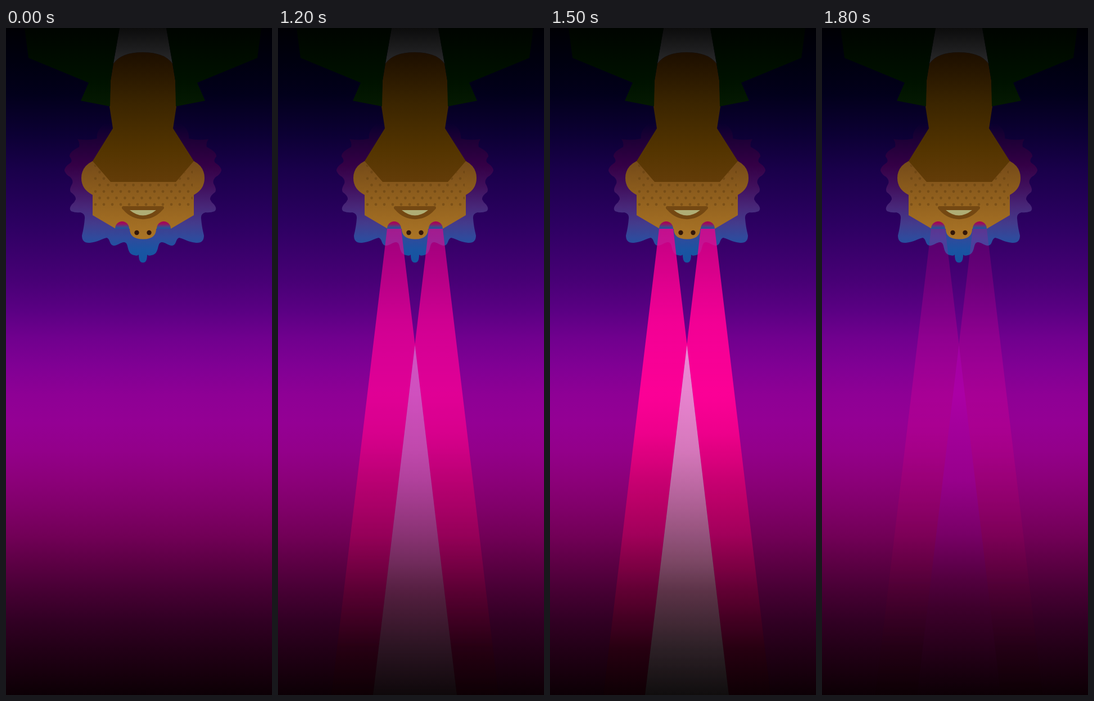
An HTML page for the animation above (1900 ms loop, 473 px wide and 1183 px high).

```html
<!DOCTYPE html>
<html lang="en">
<head>
<meta charset="utf-8">
<title>Laser eyes</title>
<style>
html, body { margin: 0; width: 100%; height: 100%; overflow: hidden; background: #000; }
svg { display: block; width: 100vw; height: 100vh; }
.beam, .tint, .glow { opacity: 0; animation: 1900ms step-end infinite; }
.beam { animation-name: beam; }
.tint { animation-name: tint; }
.glow { animation-name: glow; }
@keyframes beam {
  0% { opacity: 0; }
  52.63%, 94.73% { opacity: .23; }
  57.89%, 89.47% { opacity: .48; }
  63.15%, 84.21% { opacity: .73; }
  68.42%, 78.94% { opacity: .97; }
  73.68% { opacity: 1; }
  100% { opacity: 0; }
}
@keyframes tint {
  0% { opacity: 0; }
  52.63% { opacity: 1; }
  100% { opacity: 0; }
}
@keyframes glow {
  0%, 52.63%, 94.73% { opacity: 0; }
  57.89%, 89.47% { opacity: .25; }
  63.15%, 84.21% { opacity: .5; }
  68.42%, 78.94% { opacity: .82; }
  73.68% { opacity: 1; }
  100% { opacity: 0; }
}
</style>
</head>
<body>
<svg viewBox="0 0 473 1183" preserveAspectRatio="none">
  <defs>
    <linearGradient id="sky" gradientUnits="userSpaceOnUse" x1="0" y1="0" x2="0" y2="1183">
      <stop offset="0" stop-color="#000004"/>
      <stop offset=".05" stop-color="#00000f"/>
      <stop offset=".1" stop-color="#02001b"/>
      <stop offset=".16" stop-color="#0c0034"/>
      <stop offset=".212" stop-color="#19004a"/>
      <stop offset=".296" stop-color="#2d0062"/>
      <stop offset=".38" stop-color="#480076"/>
      <stop offset=".423" stop-color="#5a0083"/>
      <stop offset=".465" stop-color="#70008e"/>
      <stop offset=".507" stop-color="#800094"/>
      <stop offset=".55" stop-color="#8e0095"/>
      <stop offset=".592" stop-color="#940094"/>
      <stop offset=".634" stop-color="#93008a"/>
      <stop offset=".676" stop-color="#8c007a"/>
      <stop offset=".72" stop-color="#800069"/>
      <stop offset=".761" stop-color="#720057"/>
      <stop offset=".803" stop-color="#5c0044"/>
      <stop offset=".845" stop-color="#460033"/>
      <stop offset=".888" stop-color="#320024"/>
      <stop offset=".93" stop-color="#230017"/>
      <stop offset=".972" stop-color="#16000c"/>
      <stop offset="1" stop-color="#0c0005"/>
    </linearGradient>
    <linearGradient id="pink" gradientUnits="userSpaceOnUse" x1="0" y1="356" x2="0" y2="1183">
      <stop offset="0" stop-color="#f0008c" stop-opacity=".78"/>
      <stop offset=".08" stop-color="#fa0090" stop-opacity=".83"/>
      <stop offset=".2" stop-color="#ff0096" stop-opacity=".95"/>
      <stop offset=".355" stop-color="#ff0096"/>
      <stop offset=".44" stop-color="#f0008b"/>
      <stop offset=".537" stop-color="#cc0072"/>
      <stop offset=".658" stop-color="#a3005a"/>
      <stop offset=".779" stop-color="#610033"/>
      <stop offset=".9" stop-color="#280012"/>
      <stop offset="1" stop-color="#0f0005"/>
    </linearGradient>
    <linearGradient id="violet" gradientUnits="userSpaceOnUse" x1="0" y1="562" x2="0" y2="1183">
      <stop offset="0" stop-color="#a000a4"/>
      <stop offset=".14" stop-color="#ab00a5"/>
      <stop offset=".383" stop-color="#98008c"/>
      <stop offset=".544" stop-color="#780066"/>
      <stop offset=".665" stop-color="#540040"/>
      <stop offset=".75" stop-color="#3e002c"/>
      <stop offset="1" stop-color="#0c0005"/>
    </linearGradient>
    <linearGradient id="white" gradientUnits="userSpaceOnUse" x1="0" y1="562" x2="0" y2="1183">
      <stop offset="0" stop-color="#fca8e0"/>
      <stop offset=".14" stop-color="#f5a0d8"/>
      <stop offset=".3" stop-color="#e292c4"/>
      <stop offset=".464" stop-color="#b47498"/>
      <stop offset=".625" stop-color="#805669"/>
      <stop offset=".705" stop-color="#603e4b"/>
      <stop offset=".866" stop-color="#2f282a"/>
      <stop offset="1" stop-color="#121111"/>
    </linearGradient>
    <linearGradient id="hair" gradientUnits="userSpaceOnUse" x1="0" y1="170" x2="0" y2="416">
      <stop offset="0" stop-color="#0a002e"/>
      <stop offset=".12" stop-color="#1e0036"/>
      <stop offset=".3" stop-color="#340046"/>
      <stop offset=".45" stop-color="#400f5c"/>
      <stop offset=".6" stop-color="#482779"/>
      <stop offset=".72" stop-color="#433b8c"/>
      <stop offset=".82" stop-color="#304a9c"/>
      <stop offset=".91" stop-color="#1a54a2"/>
      <stop offset="1" stop-color="#1455a0"/>
    </linearGradient>
    <linearGradient id="face" gradientUnits="userSpaceOnUse" x1="0" y1="236" x2="0" y2="375">
      <stop offset="0" stop-color="#744a18"/>
      <stop offset=".4" stop-color="#8d5d1d"/>
      <stop offset="1" stop-color="#ab7526"/>
    </linearGradient>
    <linearGradient id="neck" gradientUnits="userSpaceOnUse" x1="0" y1="43" x2="0" y2="273">
      <stop offset="0" stop-color="#1c0e00"/>
      <stop offset=".4" stop-color="#3b2500"/>
      <stop offset=".75" stop-color="#533400"/>
      <stop offset="1" stop-color="#633c08"/>
    </linearGradient>
    <linearGradient id="shirt" gradientUnits="userSpaceOnUse" x1="0" y1="0" x2="0" y2="63">
      <stop offset="0" stop-color="#0c0c0c"/>
      <stop offset="1" stop-color="#29292b"/>
    </linearGradient>
    <linearGradient id="coat" gradientUnits="userSpaceOnUse" x1="0" y1="0" x2="0" y2="139">
      <stop offset="0" stop-color="#000400"/>
      <stop offset=".7" stop-color="#001200"/>
      <stop offset="1" stop-color="#051a02"/>
    </linearGradient>
    <linearGradient id="eye" gradientUnits="userSpaceOnUse" x1="0" y1="343" x2="0" y2="356">
      <stop offset="0" stop-color="#a80058"/>
      <stop offset=".35" stop-color="#96125f"/>
      <stop offset=".65" stop-color="#553c80"/>
      <stop offset="1" stop-color="#145a9c"/>
    </linearGradient>
    <pattern id="dots" patternUnits="userSpaceOnUse" x="155" y="239" width="15" height="23">
      <g fill="#5a3a0c" fill-opacity=".42">
        <circle cx="4" cy="5" r="2.4"/>
        <circle cx="11.5" cy="16.5" r="2.4"/>
      </g>
    </pattern>

    <g id="hairHalf">
      <path fill="url(#hair)" d="M245 170H175Q160 182 162 196Q146 200 127 197Q132 204 130 211
        Q112 220 113 228Q119 235 115 239Q104 246 104 253Q107 261 114 264Q120 270 118 276
        Q112 286 115 291Q125 298 124 304Q122 309 117 313Q111 321 116 325Q124 328 132 327
        Q141 329 140 338Q139 352 135 368Q135 382 149 381C163 380 172 373 179 372
        C186 374 183 385 192 386C200 386 208 376 214 382C218 388 216 401 228 403
        Q234 405 236 402Q236 416 243 416H245Z"/>
    </g>
    <path id="coatHalf" fill="url(#coat)" d="M33 0H202L191 62 186 93 185 139 133 129 147 97 40 53Z"/>
    <path id="eyeDome" fill="url(#eye)" d="M194 356A12.5 13 0 0 1 219 356Z"/>
    <path id="wedge" d="M243.5 562L318 1183H169Z"/>
  </defs>

  <rect width="473" height="1183" fill="url(#sky)"/>

  <use href="#hairHalf"/>
  <use href="#hairHalf" transform="matrix(-1 0 0 1 487 0)"/>

  <path fill="url(#face)" d="M154 236Q134 246 134 266T154 296V332L195 356H293L334 332V296Q353 286 353 266T334 236Z"/>
  <path fill="url(#dots)" d="M156 240L186 273H302L332 240V320H156Z"/>
  <path fill="url(#neck)" d="M191 63Q205 43 243.5 43T296 63L301 93 303 139 297 178 334 236 302 273H186L154 236 190 178 184 139 186 93Z"/>
  <path fill="url(#shirt)" d="M202 0H285L296 63Q282 43 243.5 43T191 63Z"/>
  <use href="#coatHalf"/>
  <use href="#coatHalf" transform="matrix(-1 0 0 1 487 0)"/>

  <path fill="#744812" d="M206 319Q206 316 209 316H278Q281 316 281 319Q281 321 278 323C260 344.500 227 344.500 209 323Q206 321 206 319Z"/>
  <path fill="#afad75" d="M220 323H267Q243.500 342 220 323Z"/>
  <use href="#eyeDome"/>
  <use href="#eyeDome" x="74"/>
  <path fill="url(#face)" d="M220 356Q220 374.500 243.500 374.500T267 356Z"/>
  <g fill="#32170a">
    <circle cx="232.500" cy="363" r="4.200"/>
    <circle cx="254.500" cy="363" r="4.200"/>
  </g>

  <path class="beam" fill="url(#pink)" d="M194 356H219L318 1183H95ZM268 356H293L392 1183H169Z"/>
  <use class="tint" href="#wedge" fill="url(#violet)"/>
  <use class="glow" href="#wedge" fill="url(#white)"/>
</svg>
</body>
</html>
```
